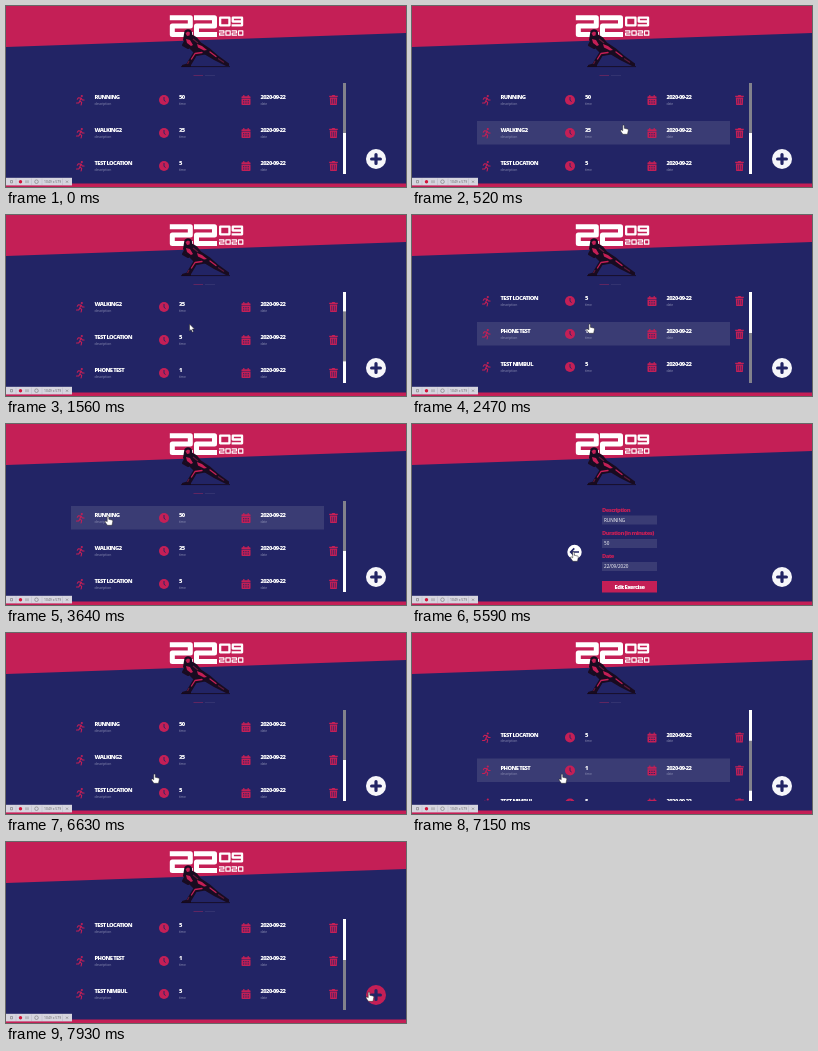
An HTML page that plays this animation: 400x181 px, repeating every 8000 ms.

```html
<!DOCTYPE html>
<html lang="en">
<head>
<meta charset="utf-8">
<title>Exercise log</title>
<style>
  html, body { margin: 0; width: 100%; height: 100%; overflow: hidden; background: #222465; }
  svg { display: block; width: 100%; height: 100%; }
  text { font-family: "Open Sans", "Noto Sans", sans-serif; }
  .bold { font-weight: 800; font-stretch: 75%; font-size: 5.8px; letter-spacing: -.6px; fill: #fff; }
  .sub { font-size: 3.4px; font-stretch: 75%; letter-spacing: -.1px; fill: #8f91b5; }
  .label { fill: #c41f56; }
  .value { font-size: 4.6px; fill: #fff; }
  .red { fill: #c41f56; }
  .line { fill: none; stroke: #c41f56; stroke-linecap: round; stroke-linejoin: round; }
  .navy { fill: none; stroke: #222465; }
  .field, .hover { fill: #3a3c74; }
  .hover { visibility: hidden; }
  .row.on .hover { visibility: visible; }
  #add circle { fill: #f6f6fa; }
  #add.on circle { fill: #c41f56; }
  #digits { fill: none; stroke: #fff; stroke-linejoin: round; }
  .limb { fill: none; stroke: #180b20; stroke-linejoin: round; stroke-linecap: round; }
  .cursor { fill: #fff; stroke: #222; stroke-width: .5; stroke-linejoin: round; }
</style>
</head>
<body>
<svg viewBox="0 0 400 181">
  <defs>
    <clipPath id="view"><rect x="60" y="77" width="276" height="91"/></clipPath>
    <g id="run">
      <circle class="red" cx="1.3" cy="-4" r="1.1"/>
      <path class="line" stroke-width="1.1" d="M-3.2-.8L-2.2-2.2L.6-2L-.7 1L1.2 2.4L.6 5M-.9 1.6L-1.8 3H-4M.6-2L1.8 0H3.6"/>
    </g>
    <g id="clock">
      <circle class="red" r="5"/>
      <path class="navy" stroke-width=".9" d="M0-3V.3L1.6 1.5"/>
    </g>
    <g id="calendar">
      <path class="red" d="M-4.5-1.8V-3q0-.8.8-.8H3.7q.8 0 .8.8v1.2zM-2.8-5h1.2v2h-1.2zM1.6-5h1.2v2H1.6zM-4.5-1.2h9v5.4q0 .8-.8.8h-7.4q-.8 0-.8-.8z"/>
      <path class="navy" stroke-width="1.1" stroke-dasharray="1.3 1" d="M-3 .7H3.2M-3 3H3.2"/>
    </g>
    <g id="trash">
      <path class="red" d="M-4.3-4.3h2.5l.6-.8h2.4l.6.8h2.5v1.2h-8.6zM-3.7-2.5h7.4L3.3 5h-6.6z"/>
      <path class="navy" stroke-width=".6" d="M-1.8-1.2V3.7M0-1.2V3.7M1.8-1.2V3.7"/>
    </g>
  </defs>

  <rect width="400" height="181" fill="#222465"/>
  <path class="red" d="M0 0H400V27L0 41zM0 177.6H400V181H0z"/>
  <g id="digits"></g>

  <g id="athlete">
    <path class="limb" stroke-width="3" d="M181 33L177.500 39L182 41.500"/>
    <path class="limb" stroke-width="4.500" d="M200 46L189 48L183 58"/>
    <path fill="#180b20" d="M178.500 25q2-2.500 5-1.500t2.500 5l5 3 4 5 9 6 8 7 11 8v2.500h-3l-12-6-10-6-10-1-7-7-4-6zM176 61v-2l5-1.500 4 1.500v2z"/>
    <path class="red" d="M179.500 27l2.500-1.500 2 1-.5 3-2.500.5zM180 33l4 1 3 5-2 1-4-3zM191 38l5 2 5 4-3 .5-6-3z"/>
    <path class="line" stroke-width="1.300" d="M196 46.500L189 47.500L185.500 53M204 46L210 50.500"/>
    <path fill="none" stroke="#5d1838" stroke-width="1.200" d="M187 33L192 37M212 52.500L218 56.500M183 55L181.500 58"/>
    <path stroke="#150a1c" stroke-width=".8" d="M175 60.600H224"/>
  </g>

  <g id="list">
    <path stroke="#7c2860" stroke-width=".7" d="M187.500 69.500H197"/>
    <path stroke="#3e3f78" stroke-width=".6" d="M199 69.500H209"/>
    <g clip-path="url(#view)"><g id="rows"></g></g>
    <rect x="337" y="77" width="3" height="91" fill="#fff"/>
    <rect id="thumb" x="337" y="77" width="3" height="50" fill="#82828c"/>
  </g>

  <g id="form">
    <text class="bold label" x="190" y="88">Description</text>
    <rect class="field" x="190" y="91.5" width="55" height="9"/>
    <text class="value" x="192" y="97.7">RUNNING</text>
    <text class="bold label" x="190" y="111">Duration (in minutes)</text>
    <rect class="field" x="190" y="115" width="55" height="9"/>
    <text class="value" x="192" y="121.2">50</text>
    <text class="bold label" x="190" y="134">Date</text>
    <rect class="field" x="190" y="138" width="55" height="9"/>
    <text class="value" x="192" y="144.2">22/09/2020</text>
    <rect class="red" x="190" y="157" width="55" height="11.5"/>
    <text class="bold" x="217.5" y="164.8" text-anchor="middle">Edit Exercise</text>
    <circle cx="162.5" cy="128" r="7.2" fill="#fff"/>
    <path class="navy" stroke-width="1.7" d="M167 128H159M162.3 124.4L158.7 128L162.3 131.6"/>
  </g>

  <g id="add">
    <circle cx="370" cy="153" r="10"/>
    <path class="navy" stroke-width="3.2" stroke-linecap="round" d="M365.600 153H374.400M370 148.600V157.400"/>
  </g>

  <g id="status">
    <rect y="171.8" width="66" height="7.6" fill="#d6d5df"/>
    <path stroke="#b9b8c4" stroke-width=".5" d="M10 172.5V179M25.5 172.5V179M36 172.5V179M56.5 172.5V179"/>
    <circle cx="14.5" cy="175.7" r="1.7" fill="#d3163c"/>
    <path fill="none" stroke="#777" stroke-width=".6" d="M4.5 174.5h2v2.4h-2zM20 174.3v2.8M22 174.3v2.8M60 174.7l2 2m0-2l-2 2"/>
    <circle cx="30.5" cy="175.7" r="1.8" fill="none" stroke="#777" stroke-width=".6"/>
    <text x="38" y="177" font-size="3.4" fill="#666">1049 x 579</text>
  </g>

  <g id="pointer">
    <path id="hand" class="cursor" d="M-.8.4Q0-.4.8.4V3.3L4 4Q5 4.3 4.8 5.4L4 9.3H-.6L-3 6Q-3.2 4.6-1.8 5L-.8 5.8z"/>
    <path id="arrow" class="cursor" d="M0 0V7L1.6 5.6L2.8 8.3L4 7.8L2.9 5.1H5z"/>
  </g>
</svg>
<script>
const $ = id => document.getElementById(id);
const LOOP = 8000, STEP = 130;

// Square numerals drawn as strokes inside a box
function digit(n, x, y, w, h, s) {
  const l = x + s / 2, r = x + w - s / 2, t = y + s / 2, b = y + h - s / 2, m = y + h / 2;
  const d = {
    0: `M${l} ${t}H${r}V${b}H${l}Z`,
    2: `M${x} ${t}H${r}V${m}H${l}V${b}H${x + w}`,
    9: `M${r} ${m}H${l}V${t}H${r}V${b}H${x}`
  }[n];
  return `<path stroke-width="${s}" d="${d}"/>`;
}
const number = (str, x, y, w, h, s, pitch) =>
  [...str].map((n, i) => digit(n, x + i * pitch, y, w, h, s)).join('');
$('digits').innerHTML = number('22', 163.8, 9.2, 23, 21.8, 5, 24.2)
  + number('09', 213, 10.5, 11.6, 10, 2.3, 12.6)
  + number('2020', 213, 24.2, 5.5, 5.6, 1.2, 6.3);

const exercises = [['RUNNING', 50], ['WALKING2', 35], ['TEST LOCATION', 5], ['PHONE TEST', 1], ['TEST NIMBUL', 5]];
const cell = (x, title, sub) =>
  `<text class="bold" x="${x}" y="93.2">${title}</text><text class="sub" x="${x}" y="98.5">${sub}</text>`;
const icon = (name, x) => `<use href="#${name}" x="${x}" y="94"/>`;
$('rows').innerHTML = exercises.map(([name, time], i) =>
  `<g class="row" transform="translate(0 ${i * 33})">
    <rect class="hover" x="65" y="82" width="253" height="23.5"/>
    ${icon('run', 74.5)}${cell(88.5, name, 'description')}
    ${icon('clock', 158)}${cell(173, time, 'time')}
    ${icon('calendar', 240)}${cell(254.5, '2020-09-22', 'date')}
    ${icon('trash', 327.5)}
  </g>`).join('');
const rows = [...document.querySelectorAll('.row')];

// Tracks of [time, ...values], linear between points
const path = [[130, 300, 82], [520, 211.5, 119], [1040, 188, 110], [1560, 183.5, 109], [2730, 176, 109],
  [3120, 150, 104], [3640, 102, 92], [4030, 102, 92], [4680, 140, 108], [4940, 146, 114], [5590, 161.5, 128],
  [6370, 161.5, 128], [6630, 148.5, 141], [7150, 150, 141], [7930, 363, 150]];
const scrolls = [[1040, 0], [1560, 35], [2080, 74], [2470, 74], [3120, 0], [6760, 0], [7280, 74]];

function sample(track, t) {
  const i = track.findIndex(p => p[0] > t);
  if (i < 0) return track[track.length - 1].slice(1);
  if (i === 0) return track[0].slice(1);
  const a = track[i - 1], b = track[i], k = (t - a[0]) / (b[0] - a[0]);
  return a.slice(1).map((v, j) => v + (b[j + 1] - v) * k);
}
const show = (id, on) => $(id).setAttribute('display', on ? 'inline' : 'none');

function draw(now) {
  const t = Math.floor((now % LOOP) / STEP) * STEP;
  const [x, y] = sample(path, t), [scroll] = sample(scrolls, t);
  const editing = t >= 4030 && t < 5850, visible = t >= 130;

  show('form', editing);
  show('list', !editing);
  $('rows').setAttribute('transform', `translate(0 ${-scroll})`);
  $('thumb').setAttribute('y', 77 + scroll * 41 / 74);

  const onAdd = Math.hypot(x - 370, y - 153) < 10;
  let hot = onAdd || (editing && Math.hypot(x - 162.5, y - 128) < 7.5);
  rows.forEach((row, i) => {
    const top = 82 + i * 33 - scroll;
    const on = visible && !editing && x > 65 && x < 318 && y > 77 && y < 168 && y > top && y < top + 23.5;
    row.classList.toggle('on', on);
    hot = hot || on;
  });
  $('add').classList.toggle('on', onAdd);

  // The hand lingers briefly after leaving a row
  const hand = hot || (t >= 6370 && t < 6760);
  show('pointer', visible);
  show('hand', hand);
  show('arrow', !hand);
  $('pointer').setAttribute('transform', `translate(${x} ${y})`);
}

const start = performance.now();
(function tick() {
  draw(performance.now() - start);
  requestAnimationFrame(tick);
})();
</script>
</body>
</html>
```
